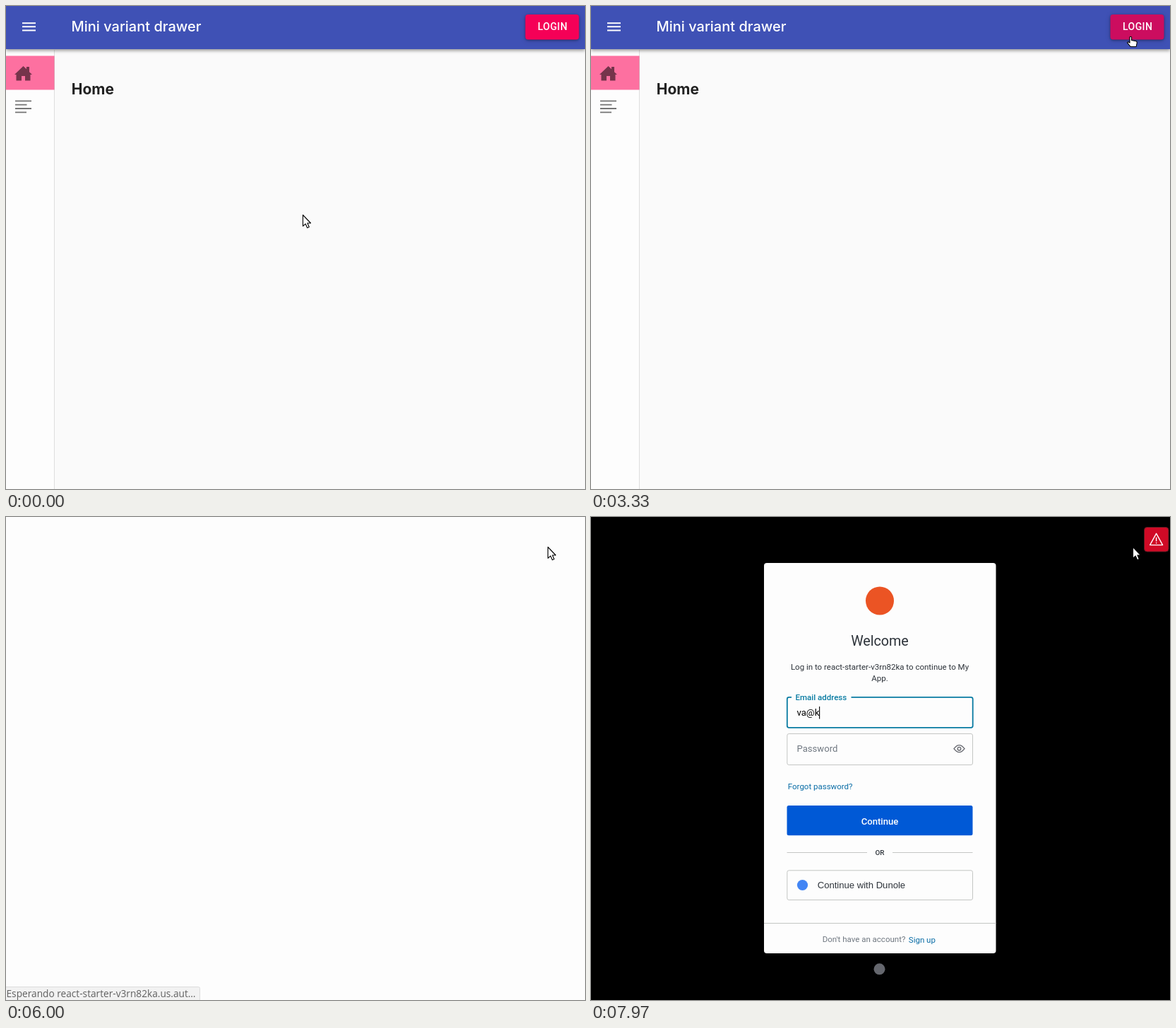
Write an HTML page that moves like this. It is 820 px wide and 683 px high and loops after 8000 ms.

```html
<!DOCTYPE html>
<html lang="en">
<head>
<meta charset="utf-8">
<title>Login flow</title>
<style>
  html, body { margin: 0; width: 100%; height: 100%; overflow: hidden; }
  svg { display: block; width: 100vw; height: 100vh; }
  text { font-family: Roboto, sans-serif; white-space: pre; }
  .inter { font-family: Inter, sans-serif; }
  .arial { font-family: "Liberation Sans", sans-serif; }
  .status { font-family: "Open Sans", sans-serif; }
  .mid { text-anchor: middle; }
  .medium { font-weight: 500; }
  .s { font-size: 11.5px; }
  .m { font-size: 13.1px; }
  .link { fill: #0a6da6; }
  .box { fill: none; stroke: #c4c6c4; }
  .bar { filter: drop-shadow(0 2px 2.5px rgba(0, 0, 0, .42)); }
  .raised { filter: drop-shadow(0 1px 1.5px rgba(0, 0, 0, .3)) drop-shadow(0 1px 3px rgba(0, 0, 0, .2)); }
</style>
</head>
<body>
<svg viewBox="0 0 820 683" preserveAspectRatio="none">
  <defs>
    <clipPath id="btnClip"><rect x="735.5" y="12" width="76" height="35.5" rx="4"/></clipPath>
  </defs>

  <g id="home">
    <rect width="820" height="683" fill="#fafafa"/>
    <rect width="69" height="683" fill="#fdfdfd"/>
    <rect y="70.5" width="68.5" height="48" fill="#fd70a0"/>
    <path d="M68.5 62V683" stroke="#000" stroke-opacity=".12"/>
    <path d="M12 97 24.5 85 29 89.3V86H33V93.2L37 97H34.5V105.5H27V99H22V105.5H14.5V97Z" fill="#75344b"/>
    <path d="M13 134.3H36M13 139.6H29.5M13 145H36M13 150.3H29" stroke="#757575" stroke-width="1.8"/>
    <text class="inter" x="92.8" y="125.2" font-size="21" font-weight="700" fill="#212121">Home</text>
    <rect class="bar" width="820" height="61" fill="#3f51b5"/>
    <path d="M23 24.3H42M23 29.2H42M23 34.5H42" stroke="#fff" stroke-width="2"/>
    <text class="inter medium" x="92.5" y="36.4" font-size="20" fill="#fff">Mini variant drawer</text>
    <rect id="btn" class="raised" x="735.5" y="12" width="76" height="35.5" rx="4"/>
    <g clip-path="url(#btnClip)"><circle id="ripple" cx="767" cy="42" fill="#fff"/></g>
    <text class="mid medium" x="774.2" y="33.6" font-size="14" letter-spacing=".4" fill="#fff">LOGIN</text>
  </g>

  <rect id="blank" width="820" height="683" fill="#fdfdfd"/>

  <g id="status">
    <path d="M-1 664.5H272.5Q274.5 664.5 274.5 666.5V684H-1Z" fill="#f2f2f2" stroke="#dcdcdc"/>
    <text class="status" x="0.5" y="679" font-size="13.7" fill="#606060">Esperando react-starter-v3rn82ka.us.aut…</text>
  </g>

  <g id="login">
    <rect width="820" height="683"/>
    <rect x="245" y="65" width="328.5" height="552" rx="4" fill="#fdfdfd"/>
    <circle cx="409" cy="118.5" r="20" fill="#eb5424"/>
    <text class="mid" x="409" y="181.7" font-size="19.7" fill="#2d333a">Welcome</text>
    <g class="mid s" fill="#2d333a">
      <text x="409" y="215.6">Log in to react-starter-v3rn82ka to continue to My</text>
      <text x="409" y="232">App.</text>
    </g>

    <rect x="277.8" y="254.8" width="262.9" height="43" rx="2.5" fill="none" stroke="#087ba2" stroke-width="1.8"/>
    <path d="M284 254.8H368.5" stroke="#fdfdfd" stroke-width="4"/>
    <text class="s medium" x="289.5" y="258.6" fill="#087ba2">Email address</text>
    <text id="email" class="m" x="291.5" y="281.4"></text>
    <rect id="caret" y="268" width="1.1" height="17.5"/>

    <rect class="box" x="277.8" y="306.5" width="262.7" height="44" rx="2.5"/>
    <text class="m" x="291.5" y="332.4" fill="#6f7780">Password</text>
    <g fill="none" stroke="#65676e" stroke-width="1.3">
      <path d="M514 327.7Q521.5 317.7 529 327.7Q521.5 337.7 514 327.7Z"/>
      <circle cx="521.5" cy="327.7" r="2.3"/>
    </g>
    <text class="s link" x="278.8" y="384.5">Forgot password?</text>

    <rect x="277.5" y="408" width="263" height="42.3" rx="2.5" fill="#0059d6"/>
    <text class="m mid medium" x="409" y="434.5" fill="#fff">Continue</text>
    <path class="box" d="M277.5 474.5H391M427 474.5H540.5"/>
    <text class="mid medium" x="409" y="478.3" font-size="9.84" fill="#2d333a">OR</text>

    <rect class="box" x="277.8" y="499.8" width="262.7" height="41.7" rx="2.5"/>
    <circle cx="299.5" cy="520.5" r="7.6" fill="#4285f4"/>
    <text class="m arial" x="320.7" y="525.2" fill="#2d333a">Continue with Dunole</text>

    <path class="box" d="M245 574.5H573.5"/>
    <text class="s" x="327.7" y="601.4" fill="#6f7780">Don't have an account?</text>
    <text class="s link" x="449.8" y="601.8">Sign up</text>
    <circle cx="408.5" cy="639.3" r="8" fill="#65676e"/>

    <rect x="783.5" y="14.5" width="34.5" height="34.5" rx="4" fill="#d00a26" stroke="#5a1a20"/>
    <g fill="none" stroke="#fff" stroke-width="1.4" stroke-linejoin="round">
      <path d="M800.6 23.3 809.6 39.6H791.6Z"/>
      <path d="M800.6 28.8V34.4M800.6 36V37.6"/>
    </g>
  </g>

  <g id="pointer" fill="#fff" stroke="#000" stroke-width="1.1" stroke-linejoin="round">
    <path id="arrow" d="M0 0V15.8L3.7 12.5 6.2 18.2 8.8 17 6.4 11.5H11Z"/>
    <path id="hand" d="M-4.5 1.5Q-3.2 0 -2 1.5V6L4.6 7.3Q5.9 8 5.7 9.8L4.6 15H-3.4L-8 9.4Q-7.6 7.8 -5.6 8.8L-4.5 9.6Z"/>
  </g>
</svg>

<script>
const LOOP = 8000;
const ENTER = 2870, CLICK = 4170, STATUS = 4400, WAIT = 4700, BLANK = 5900, LOGIN = 6100;
const BLINK = 500;

// time, x, y of the pointer tip
const path = [
  [1180, 420.5, 295.5], [1400, 440, 296], [1690, 540, 215],
  [2170, 673.5, 110.5], [2520, 733, 83], [2920, 767.5, 42.5]
];
const keys = [[7150, "v"], [7330, "a"], [7700, "@"], [7900, "k"]];

const el = Object.fromEntries([...document.querySelectorAll("svg [id]")].map(n => [n.id, n]));
const clamp = v => Math.min(1, Math.max(0, v));
const mix = (a, b, k) => a + (b - a) * k;
const easeOut = k => 1 - (1 - k) ** 3;
const show = (node, on) => node.setAttribute("visibility", on ? "visible" : "hidden");

function slope(i, axis) {
  const a = path[i - 1], b = path[i + 1];
  return a && b ? (b[axis] - a[axis]) / (b[0] - a[0]) : 0;
}

// cubic Hermite curve through the path points
function along(t, axis) {
  const last = path.length - 1;
  if (t <= path[0][0]) return path[0][axis];
  if (t >= path[last][0]) return path[last][axis];
  const i = path.findIndex(p => p[0] > t) - 1;
  const a = path[i], b = path[i + 1], d = b[0] - a[0], u = (t - a[0]) / d;
  return mix(a[axis], b[axis], u * u * (3 - 2 * u))
    + d * u * (1 - u) * ((1 - u) * slope(i, axis) - u * slope(i + 1, axis));
}

function drawButton(t) {
  const k = easeOut(clamp((t - ENTER) / 250));
  el.btn.setAttribute("fill", `rgb(${mix(245, 204, k)},${mix(0, 13, k)},${mix(87, 95, k)})`);
  const r = clamp((t - CLICK) / 550);
  el.ripple.setAttribute("r", 75 * easeOut(r));
  el.ripple.setAttribute("opacity", r > 0 ? .3 * (1 - r) : 0);
}

function drawEmail(t) {
  const typed = keys.filter(k => k[0] <= t);
  const since = typed.length ? typed[typed.length - 1][0] : LOGIN + 100;
  el.email.textContent = typed.map(k => k[1]).join("");
  el.caret.setAttribute("x", 291.3 + el.email.getComputedTextLength());
  show(el.caret, t >= since && Math.floor((t - since) / BLINK) % 2 === 0);
}

function render(t) {
  show(el.home, t < BLANK);
  show(el.blank, t >= BLANK && t < LOGIN);
  show(el.status, t >= STATUS && t < LOGIN);
  show(el.login, t >= LOGIN);
  drawButton(t);
  if (t >= LOGIN) drawEmail(t);
  else show(el.caret, false);

  const onLink = t >= ENTER && t < WAIT;
  show(el.hand, onLink);
  show(el.arrow, !onLink);
  el.pointer.setAttribute("transform", `translate(${along(t, 1)} ${along(t, 2)})`);
}

const start = performance.now();
function tick() {
  render((performance.now() - start) % LOOP);
  requestAnimationFrame(tick);
}
render(0);
requestAnimationFrame(tick);
</script>
</body>
</html>
```
